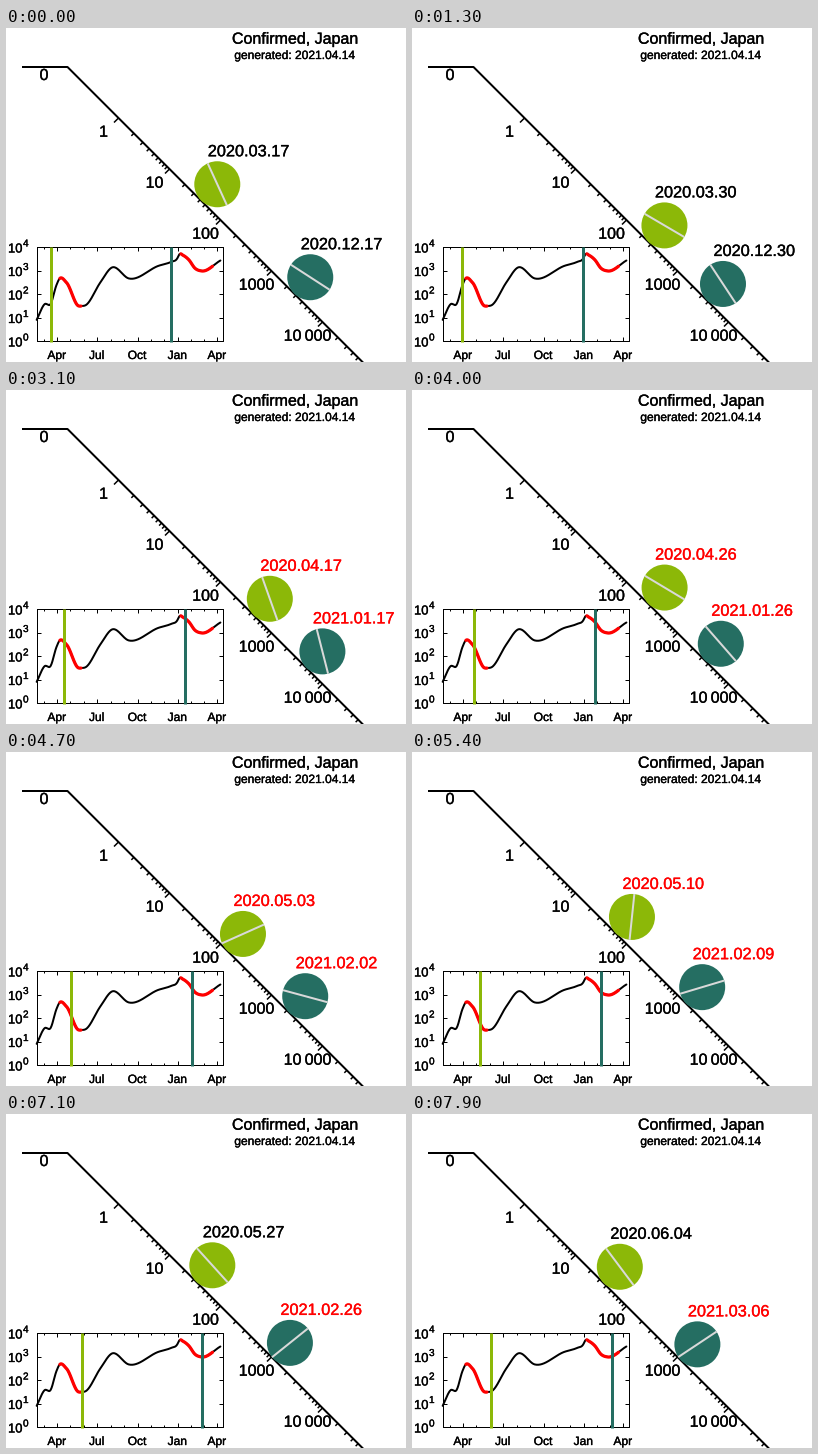
A matplotlib script that plays this animation: 400x334 px, repeating every 8000 ms.

```python
import numpy as np
import matplotlib.pyplot as plt
from matplotlib.animation import FuncAnimation
from matplotlib.patheffects import withStroke

W, H, DPI = 400, 334, 100
PT = 72 / DPI
FRAMES = 80

GREEN, TEAL, RED = "#8cb808", "#256e62", "#ff0000"
plt.rcParams["font.family"] = ["Liberation Sans", "DejaVu Sans"]

# Slope geometry
KNEE_X, KNEE_Y = 61.5, 39
DECADE = 51
R = 23

# Inset plot geometry
LEFT, RIGHT, TOP, BOTTOM = 31, 217, 219, 313
DAY_W, DAY0_X = 0.4385, 44.7
TICK_H = (BOTTOM - TOP) / 4
CURVE_H = 23

DAY0 = np.datetime64("2020-03-17")
EMERGENCIES = [("2020-04-07", "2020-05-25"), ("2021-01-08", "2021-03-21")]

# Turning points of the waves: day since DAY0, log10 of daily cases
DAYS, LOGS = np.array([
    (-32, .92), (-14, 1.6), (0, 1.618), (13, 2.425), (19, 2.68), (36, 2.54),
    (63, 1.53), (70, 1.52), (79, 1.55), (113, 2.54), (139, 3.19),
    (178, 2.72), (246, 3.27), (275, 3.441), (288, 3.573), (294, 3.78),
    (302, 3.725), (315, 3.53), (329, 3.165), (344, 3.046), (387, 3.5)]).T
SLOPES = np.gradient(LOGS, DAYS)


def cases_log(day):
    """Cubic Hermite curve through the turning points."""
    day = np.asarray(day, float)
    i = np.clip(np.searchsorted(DAYS, day, "right") - 1, 0, len(DAYS) - 2)
    h = DAYS[i + 1] - DAYS[i]
    t = (day - DAYS[i]) / h
    ease = t * t * (3 - 2 * t)
    return (LOGS[i] + ease * (LOGS[i + 1] - LOGS[i])
            + t * (1 - t) * h * ((1 - t) * SLOPES[i] - t * SLOPES[i + 1]))


def day_of(date):
    return int((np.datetime64(date) - DAY0).astype(int))


def day_x(day):
    return DAY0_X + DAY_W * day


def in_emergency(day):
    return any(day_of(a) <= day <= day_of(b) for a, b in EMERGENCIES)


fig = plt.figure(figsize=(W / DPI, H / DPI), dpi=DPI, facecolor="white")
ax = fig.add_axes([0, 0, 1, 1])
ax.set_xlim(0, W)
ax.set_ylim(H, 0)
ax.axis("off")


def line(xs, ys, width, color="black", **kw):
    kw.setdefault("solid_capstyle", "butt")
    return ax.plot(xs, ys, color=color, lw=width * PT, **kw)[0]


def ink(label, color):
    """Colour a text and thicken its strokes slightly."""
    label.set_color(color)
    label.set_path_effects([withStroke(linewidth=0.35 * PT, foreground=color)])


def text(x, y, s, size, ha="center", **kw):
    label = ax.text(x, y, s, fontsize=size * PT, ha=ha, va="baseline", **kw)
    ink(label, "black")
    return label


def draw_slope():
    line([16, KNEE_X, KNEE_X + 300], [KNEE_Y, KNEE_Y, KNEE_Y + 300], 2)
    text(38, 52, "0", 16)
    for exp in range(5):
        for m in range(1, 10):
            s = DECADE * (1 + exp + np.log10(m))
            x, y, size = KNEE_X + s, KNEE_Y + s, 4.5 if m == 1 else 2.5
            line([x, x - size], [y, y + size], 1.5)
        s = DECADE * (1 + exp)
        number = str(10 ** exp) if exp < 4 else "10\u2009000"
        text(KNEE_X + s - 15, KNEE_Y + s + 18.7, number, 16)


def draw_inset():
    line([LEFT, RIGHT, RIGHT, LEFT, LEFT], [TOP, TOP, BOTTOM, BOTTOM, TOP], 1,
         solid_capstyle="projecting")
    for exp in range(5):
        y = BOTTOM - TICK_H * exp
        line([LEFT, LEFT + 4], [y, y], 1)
        line([RIGHT - 4, RIGHT], [y, y], 1)
        text(2, y + 5.5, "10", 13, ha="left")
        text(17, y - 0.5, str(exp), 10, ha="left")

    names = {1: "Jan", 4: "Apr", 7: "Jul", 10: "Oct"}
    for month in np.arange("2020-03", "2021-05", dtype="datetime64[M]"):
        x = day_x(day_of(month))
        name = names.get(int(str(month)[-2:]))
        size = 4 if name else 2
        line([x, x], [BOTTOM, BOTTOM - size], 1)
        line([x, x], [TOP, TOP + size], 1)
        if name:
            text(x - 0.5, 331, name, 12)

    def curve(first, last, width, color):
        days = np.arange(first, last + 1)
        line(day_x(days), BOTTOM - CURVE_H * cases_log(days), width, color,
             solid_capstyle="round")

    curve(DAYS[0], DAYS[-1], 2, "black")
    for start, end in EMERGENCIES:
        curve(day_of(start), day_of(end), 3.2, RED)


class Ball:
    """A disc rolling on the slope, with its date and inset marker."""

    def __init__(self, start, color):
        self.start = np.datetime64(start)
        self.disc = ax.add_patch(plt.Circle((0, 0), R, fc=color, ec="none",
                                            zorder=3))
        self.spoke = line([], [], 2, "#d9d9d9", zorder=4)
        self.label = text(0, 0, "", 16.3, ha="left", zorder=5)
        self.marker = line([], [], 3, color, zorder=4)

    def update(self, k):
        date = self.start + k
        day = day_of(date)
        s = DECADE * (1 + float(cases_log(day)))
        cx = KNEE_X + s + R / np.sqrt(2)
        cy = KNEE_Y + s - R / np.sqrt(2)
        turn = s * np.sqrt(2) / R - np.pi / 4
        dx, dy = R * np.cos(turn), R * np.sin(turn)

        self.disc.center = cx, cy
        self.spoke.set_data([cx - dx, cx + dx], [cy - dy, cy + dy])
        self.label.set_position((cx - 9.5, cy - 28))
        self.label.set_text(str(date).replace("-", "."))
        ink(self.label, RED if in_emergency(day) else "black")
        x = day_x(day)
        self.marker.set_data([x, x], [TOP, BOTTOM + 1])
        return self.disc, self.spoke, self.label, self.marker


text(289, 15.7, "Confirmed, Japan", 16)
text(289, 31, "generated: 2021.04.14", 12)
draw_slope()
draw_inset()
balls = [Ball("2020-03-17", GREEN), Ball("2020-12-17", TEAL)]


def update(k):
    return [artist for ball in balls for artist in ball.update(k)]


anim = FuncAnimation(fig, update, frames=FRAMES, interval=100,
                     init_func=lambda: update(0), repeat=True, repeat_delay=0)
plt.show()
```
